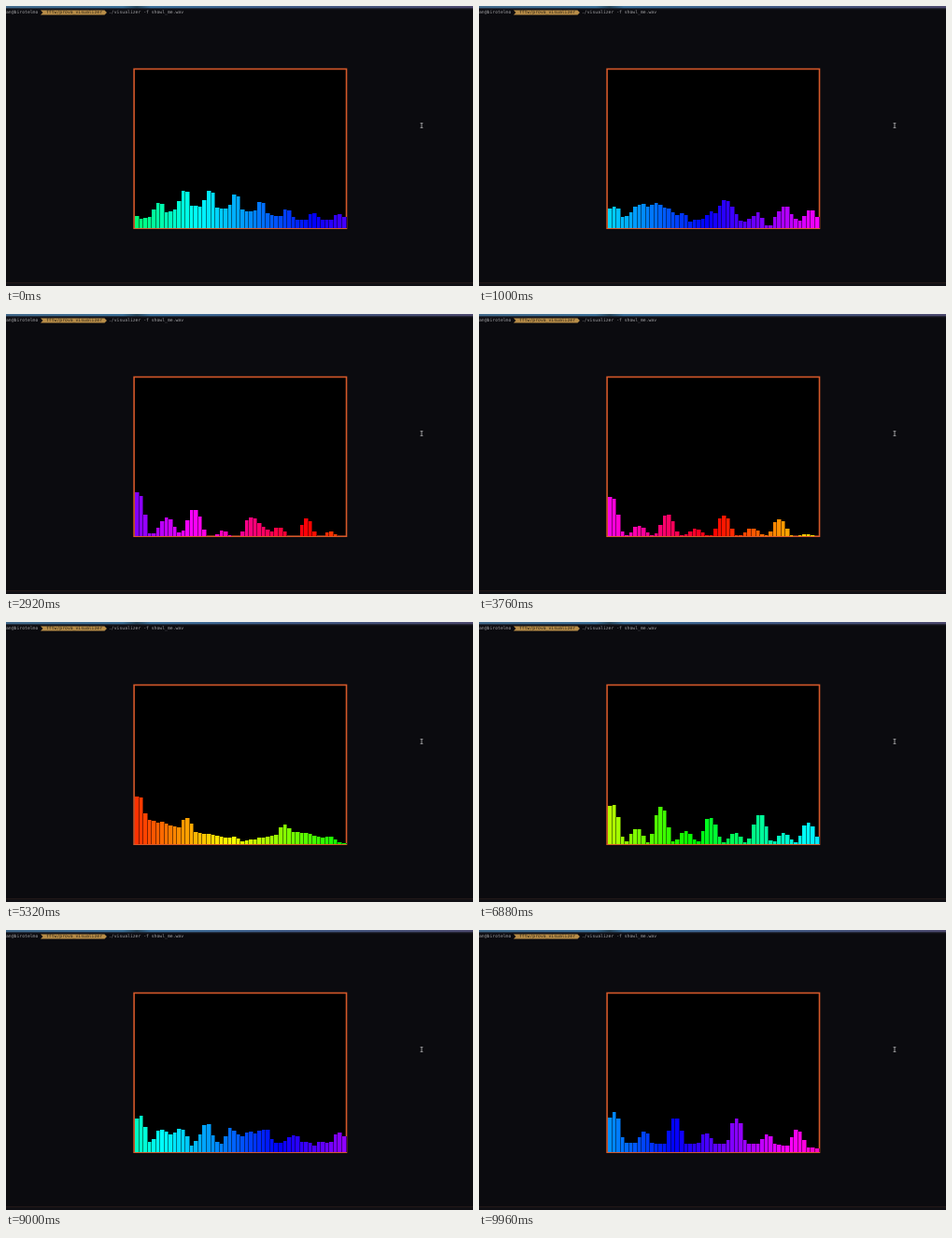
Animation of 500x300 px, one loop 10 s. Source, as an HTML page with a canvas:

```html
<!DOCTYPE html>
<html lang="en">
<head>
<meta charset="utf-8">
<title>Spectrum visualizer</title>
<style>
  html, body { margin: 0; width: 100%; height: 100%; overflow: hidden; background: #0b0b0f; }
  svg, canvas { position: absolute; left: 0; top: 0; width: 500px; height: 300px; }
  text { font: 4.75px "DejaVu Sans Mono", monospace; white-space: pre; }
</style>
</head>
<body>
<svg viewBox="0 0 500 300">
  <defs>
    <linearGradient id="sky">
      <stop offset="0" stop-color="#41688a"/>
      <stop offset=".25" stop-color="#3b7098"/>
      <stop offset=".28" stop-color="#27485e"/>
      <stop offset=".31" stop-color="#3c719c"/>
      <stop offset=".6" stop-color="#3f5a86"/>
      <stop offset="1" stop-color="#4b486c"/>
    </linearGradient>
  </defs>
  <rect width="500" height="300" fill="#0b0b0f"/>
  <rect width="500" height="2.6" fill="url(#sky)"/>
  <rect y="2.6" width="500" height="1" fill="#191a22"/>
  <rect y="296.4" width="500" height="1" fill="#30211f"/>
  <rect y="297.4" width="500" height="2.6" fill="#100f14"/>
  <path d="M37 4.5H105.5L108 7L105.5 9.5H37L39.5 7Z" fill="#b88d48"/>
  <text x="0" y="8.4" fill="#a2a2a5">an@birotelmo</text>
  <text x="43" y="8.4" fill="#2b2214">fftw/prova_visualizer</text>
  <text x="110" y="8.4" fill="#a2a2a5">./visualizer -f showl_me.wav</text>
  <rect x="137.1" y="67.5" width="227.4" height="170.7" fill="#000" stroke="#d4582a" stroke-width="1.6"/>
  <path d="M443.6 125.6H446.4M445 125.6V130.4M443.6 130.4H446.4" fill="none" stroke="#a5a5a8" stroke-width=".9"/>
</svg>
<canvas id="bars" width="500" height="300"></canvas>
<script>
const LOOP = 10000, STEP = 40, BARS = 50;
const LEFT = 138, PITCH = 4.53, BASE = 238;

// A chord: harmonics every `gap` bars, softer ones (`weak`) halfway between,
// `floor` for the valleys and `env` for loudness from low to high pitch
const chords = [
  { at: 0,   first: 5.1, gap: 12.2, weak: 1,   floor: .55, env: [15, 44, 35, 17, 15] },
  { at: 51,  first: .8,  gap: 13.2, weak: .5,  floor: .12, env: [48, 29, 28, 30, 20] },
  { at: 94,  first: .4,  gap: 13.3, weak: .35, floor: 0,   env: [43, 23, 22, 23, 0] },
  { at: 133, first: .6,  gap: 11.4, weak: .6,  floor: .55, env: [53, 27, 5, 25, 0] },
  { at: 172, first: .6,  gap: 11.6, weak: .4,  floor: .06, env: [43, 40, 27, 33, 20] },
  { at: 202, first: .8,  gap: 10.4, weak: .9,  floor: .45, env: [42, 32, 28, 17, 26] },
  { at: 249, first: 1,   gap: 14.5, weak: .55, floor: .25, env: [44, 37, 37, 35, 15] }
];

const ctx = document.getElementById('bars').getContext('2d');

const mix = (a, b, u) => a + (b - a) * u;
const ease = u => u * u * (3 - 2 * u);

function rand(a, b) {
  const v = Math.sin(a * 127.1 + b * 311.7) * 43758.5453;
  return v - Math.floor(v);
}

// Smooth noise across bars and steps, from -1 to 1
function noise(x, y) {
  const i = Math.floor(x), j = Math.floor(y), u = ease(x - i), v = ease(y - j);
  return 2 * mix(mix(rand(i, j), rand(i + 1, j), u), mix(rand(i, j + 1), rand(i + 1, j + 1), u), v) - 1;
}

// Rounded lobe around the nearest of evenly spaced centres
function lobe(x, gap) {
  const d = Math.abs(x - Math.round(x / gap) * gap);
  return Math.exp(-((d / 2) ** 2.6));
}

function level({ first, gap, weak, floor, env }, bar) {
  const x = bar / BARS * (env.length - 1), i = Math.floor(x);
  const loud = mix(env[i], env[i + 1], x - i);
  const d = bar - first;
  return loud * Math.max(floor, lobe(d, gap), weak * lobe(d - gap / 2, gap));
}

function height(bar, step) {
  const k = Math.max(1, chords.findIndex(c => c.at >= step));
  const a = chords[k - 1], b = chords[k];
  const u = (step - a.at) / (b.at - a.at);
  const sway = Math.sqrt(Math.max(0, Math.sin(Math.PI * u)));
  return mix(level(a, bar), level(b, bar), ease(u)) + 9 * sway * noise(bar / 2.5, step / 2.5);
}

function draw(now) {
  const step = Math.floor((now % LOOP) / STEP);
  ctx.clearRect(0, 0, 500, 300);
  for (let bar = 0; bar < BARS; bar++) {
    const h = Math.round(height(bar, step));
    if (h < 1) continue;
    const x = Math.round(LEFT + bar * PITCH);
    const w = Math.round(LEFT + (bar + 1) * PITCH) - x;
    ctx.fillStyle = `hsl(${(148 + step * 1.68 + bar * 2.2) % 360} 100% 50%)`;
    ctx.fillRect(x, BASE - h, w, h);
    ctx.fillStyle = 'rgba(0, 0, 0, .5)';
    ctx.fillRect(x + w - 1, BASE - h, 1, h);
  }
}

const start = performance.now();
function tick() {
  draw(performance.now() - start);
  requestAnimationFrame(tick);
}
tick();
</script>
</body>
</html>
```
